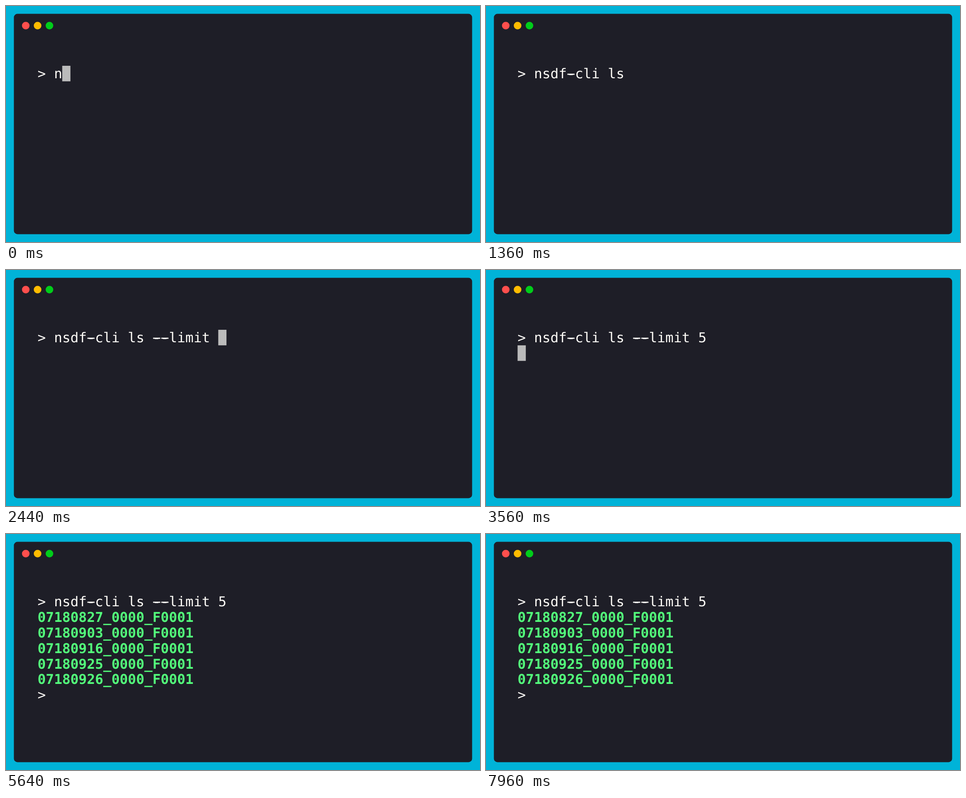
An HTML page for the animation above (8 s loop, 1058 by 529 pixels).

```html
<!DOCTYPE html>
<html lang="en">
<head>
<meta charset="utf-8">
<title>Terminal session</title>
<style>
  html, body { margin: 0; width: 100%; height: 100%; overflow: hidden; background: #00b3d8; }
  svg { display: block; width: 100%; height: 100%; }
  text {
    font: 30.45px "DejaVu Sans Mono", "Liberation Mono", monospace;
    fill: #fffdf8;
    white-space: pre;
    text-rendering: geometricPrecision;
  }
  .file { font-weight: bold; fill: #53ff7b; }
  .dash { fill: #fffdf8; }
</style>
</head>
<body>
<svg viewBox="0 0 1058 529">
  <rect width="1058" height="529" fill="#00b3d8"/>
  <rect x="17.6" y="17.6" width="1022.8" height="493.8" rx="8" fill="#1e1e27"/>
  <circle cx="44.1" cy="44.1" r="8.5" fill="#ff4f4d"/>
  <circle cx="70.5" cy="44.1" r="8.5" fill="#ffbc00"/>
  <circle cx="97" cy="44.1" r="8.5" fill="#00cd1a"/>
  <g id="screen"></g>
  <rect id="cursor" width="18.33" height="34.85" fill="#bbbbbb"/>
</svg>
<script>
const LOOP = 8000;
const LEFT = 70.5, TOP = 134, CELL = 18.33, ROW = 34.85, BASE = 28.1;
const COMMAND = "nsdf-cli ls --limit 5";
const FIRST_PART = "nsdf-cli ls".length;
const FILES = ["0827", "0903", "0916", "0925", "0926"].map(day => `0718${day}_0000_F0001`);
const ENTER = 3560, OUTPUT = 3880, PROMPT = 3920;
const BLINKS = [[1360, 1800], [3080, ENTER], [4520, 5080], [5640, 6240], [6800, 7400], [7960, LOOP]];

const screen = document.getElementById("screen");
const cursor = document.getElementById("cursor");

function add(tag, attrs, text = "") {
  const el = document.createElementNS("http://www.w3.org/2000/svg", tag);
  for (const name in attrs) el.setAttribute(name, attrs[name]);
  el.textContent = text;
  screen.append(el);
  return el;
}

const addLine = (row, text, cls = "") =>
  add("text", { x: LEFT, y: TOP + row * ROW + BASE, class: cls }, text);

const commandLine = addLine(0, "> ");
const files = FILES.map((name, i) => addLine(i + 1, name, "file"));
const lastPrompt = addLine(6, "> ");

// Hyphens span nearly the whole cell, wider than the font's own.
const dashes = [...COMMAND].flatMap((char, i) => char === "-" ? [{
  i, el: add("rect", { x: LEFT + (i + 2) * CELL + 1.2, y: 151.7, width: 16, height: 2.6, class: "dash" })
}] : []);

const show = (el, on) => el.setAttribute("visibility", on ? "visible" : "hidden");

// One character per 80 ms; the last of each burst comes after 40 ms.
function typedCount(t) {
  if (t >= 2480) return COMMAND.length;
  if (t >= 1800) return FIRST_PART + 1 + Math.floor((t - 1800) / 80);
  if (t >= 760) return FIRST_PART;
  return 1 + Math.floor(t / 80);
}

function cursorCell(t, count) {
  if (t < ENTER) return [2 + count, 0];
  if (t < OUTPUT) return [0, 1];
  return [t < PROMPT ? 0 : 2, 6];
}

function draw(t) {
  const count = typedCount(t);
  commandLine.textContent = "> " + COMMAND.slice(0, count);
  dashes.forEach(({ i, el }) => show(el, i < count));
  files.forEach(el => show(el, t >= OUTPUT));
  show(lastPrompt, t >= PROMPT);

  const [col, row] = cursorCell(t, count);
  cursor.setAttribute("x", LEFT + col * CELL);
  cursor.setAttribute("y", TOP + row * ROW);
  show(cursor, !BLINKS.some(([from, to]) => t >= from && t < to));
}

let start;
function tick(now) {
  start ??= now;
  draw((now - start) % LOOP);
  requestAnimationFrame(tick);
}
draw(0);
requestAnimationFrame(tick);
</script>
</body>
</html>
```
